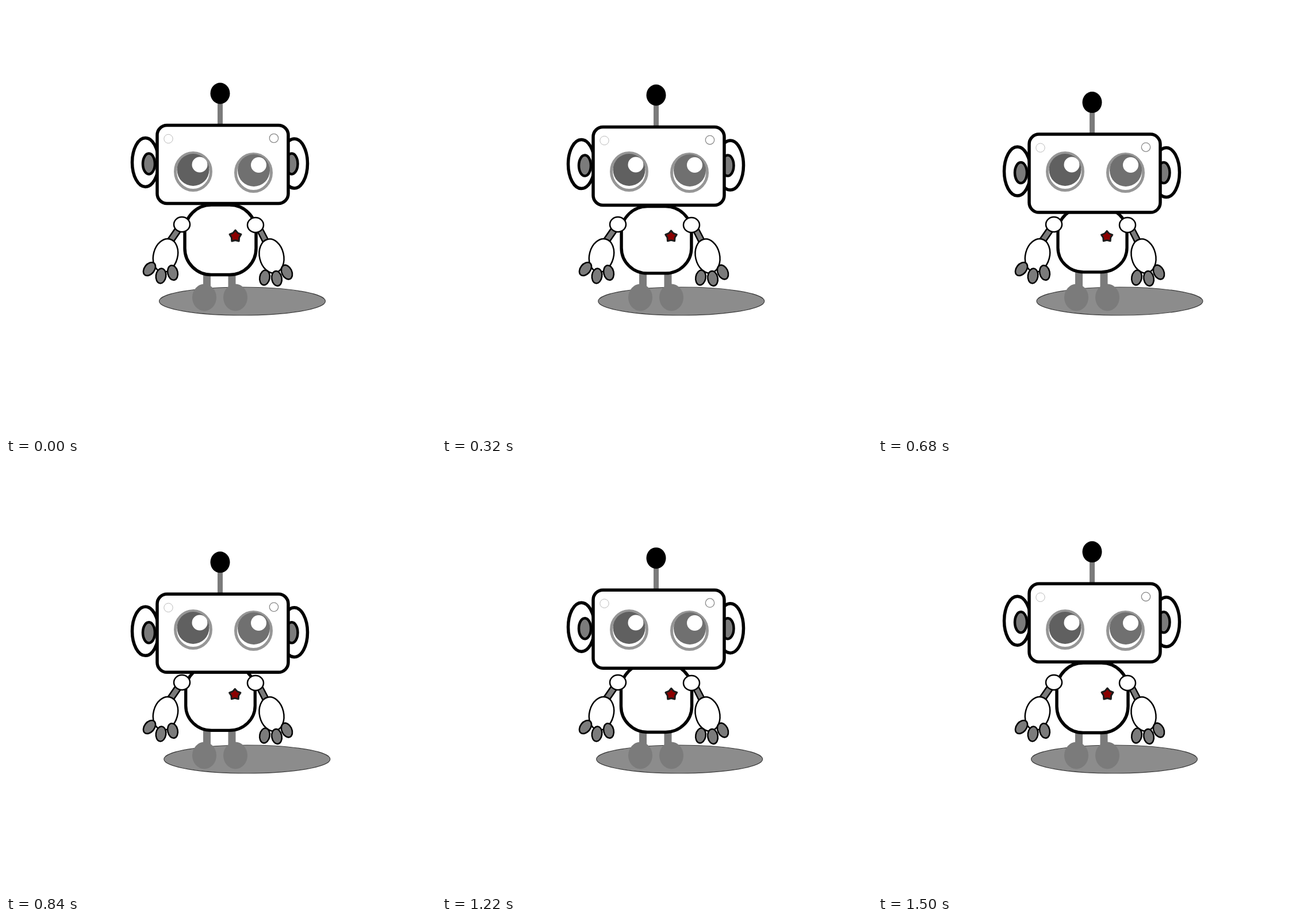
These frames come from a looping animation (748x748 px, 1520 ms). An HTML page:

```html
<!DOCTYPE html>
<html lang="en">
<head>
<meta charset="utf-8">
<title>Bobbing robot</title>
<style>
  html, body { margin: 0; height: 100%; overflow: hidden; background: #fff; }
  svg { display: block; width: 100vw; height: 100vh; }
  .grey { fill: #7b7b7b; }
  .outline { fill: #fff; stroke: #000; stroke-width: 5.5; }
  .limb { fill: #fff; stroke: #000; stroke-width: 2.5; }
  .limb .grey { fill: #7b7b7b; }
</style>
</head>
<body>
<svg viewBox="0 0 748 748">
  <ellipse id="shadow" cx="411" cy="513.5" rx="144.5" ry="24.5" fill="#8c8c8c" stroke="#3a3a3a" stroke-width="1.2"/>

  <g class="grey">
    <path d="M343 455h13v40h-13zM386.500 455h13v40h-13z"/>
    <ellipse cx="345" cy="507" rx="21" ry="23.5"/>
    <ellipse cx="399" cy="507" rx="21" ry="23.5"/>
  </g>

  <g id="body">
    <rect class="outline" x="311" y="346" width="124" height="121.500" rx="46"/>
    <path id="star" fill="#8b0000" stroke="#1c1c1c" stroke-width="3" stroke-linejoin="round"/>
  </g>

  <g class="limb">
    <path class="grey" d="M297 383l9 6-18 26-9-6z"/>
    <ellipse cx="306" cy="380" rx="14" ry="13"/>
    <ellipse rx="21" ry="29.500" transform="translate(277.500 434) rotate(15)"/>
    <g id="leftFingers"></g>
  </g>
  <g class="limb">
    <path class="grey" d="M436 389l9-4 13 25-9 5z"/>
    <ellipse cx="434" cy="381" rx="14" ry="13"/>
    <ellipse rx="21" ry="30" transform="translate(462 435) rotate(-13)"/>
    <g id="rightFingers"></g>
  </g>

  <g id="head">
    <path class="grey" d="M368 165h9v42h-9z"/>
    <ellipse cx="372.5" cy="152" rx="17" ry="18.5"/>
    <g class="outline">
      <ellipse cx="242.500" cy="272" rx="23" ry="42.5"/>
      <ellipse cx="501.500" cy="274" rx="23" ry="43"/>
      <g class="grey" stroke-width="4.5">
        <ellipse cx="248.500" cy="274.5" rx="10.5" ry="18"/>
        <ellipse cx="497" cy="274.5" rx="10.5" ry="18"/>
      </g>
      <rect x="263" y="207.500" width="228" height="136" rx="17"/>
    </g>
    <circle cx="282.5" cy="231" r="7.7" fill="#fff" stroke="#bbb"/>
    <circle cx="466" cy="230" r="7.7" fill="#fff" stroke="#888" stroke-width="1.3"/>
  </g>

  <g fill="#fff" stroke="#969696" stroke-width="5">
    <ellipse cx="325.5" cy="288" rx="31" ry="32.500"/>
    <ellipse cx="430.5" cy="290" rx="31" ry="32.500"/>
  </g>
  <circle cx="325.5" cy="285" r="28" fill="#606060"/>
  <circle cx="431" cy="286" r="28" fill="#707070"/>
  <g fill="#fff">
    <circle cx="337" cy="276" r="13.5"/>
    <circle cx="439.5" cy="276.5" r="13.5"/>
  </g>
</svg>
<script>
const LOOP = 1520, SQUASH_PEAK = 608, HEAD_START = 85, HEAD_LOW = 945;
const el = id => document.getElementById(id);
const clamp = x => Math.min(1, Math.max(0, x));

// Standard ease-in-out curve, cubic-bezier(.42, 0, .58, 1)
function easeInOut(x) {
  let low = 0, high = 1, p = 0.5;
  for (let i = 0; i < 20; i++) {
    const bx = 1.26 * p * (1 - p) ** 2 + 1.74 * p * p * (1 - p) + p ** 3;
    if (bx < x) low = p; else high = p;
    p = (low + high) / 2;
  }
  return p * p * (3 - 2 * p);
}

const finger = ([x, y, turn]) =>
  `<ellipse class="grey" rx="8.700" ry="13" transform="translate(${x} ${y}) rotate(${turn})"/>`;
el("leftFingers").innerHTML = [[249.5, 457.5, 38], [269.5, 469.5, 8], [290, 464, -12]].map(finger).join("");
el("rightFingers").innerHTML = [[450, 472.5, 10], [471, 474, -10], [488.5, 463, -25]].map(finger).join("");

const starPoint = (_, i) => {
  const angle = i * Math.PI / 5, r = i % 2 ? 7 : 10.5;
  return `${399 + r * Math.sin(angle)} ${400.5 - r * Math.cos(angle)}`;
};
el("star").setAttribute("d", `M${Array.from({ length: 10 }, starPoint).join("L")}Z`);

function draw(now) {
  const t = now % LOOP;
  const squash = t < SQUASH_PEAK
    ? easeInOut(t / SQUASH_PEAK)
    : 1 - easeInOut((t - SQUASH_PEAK) / (LOOP - SQUASH_PEAK));
  const drop = t < HEAD_LOW
    ? easeInOut(clamp((t - HEAD_START) / (HEAD_LOW - HEAD_START)))
    : 1 - ((t - HEAD_LOW) / (LOOP - HEAD_LOW)) ** 1.25;

  el("shadow").setAttribute("transform", `translate(${9.6 * squash} 0)`);
  el("body").setAttribute("transform",
    `translate(373 407) scale(${1 - 0.032 * squash} ${1 - 0.078 * squash}) translate(-373 -407)`);
  el("head").setAttribute("transform", `translate(0 ${19.4 * drop})`);
}

const start = performance.now();
function tick() {
  draw(performance.now() - start);
  requestAnimationFrame(tick);
}
tick();
</script>
</body>
</html>
```
